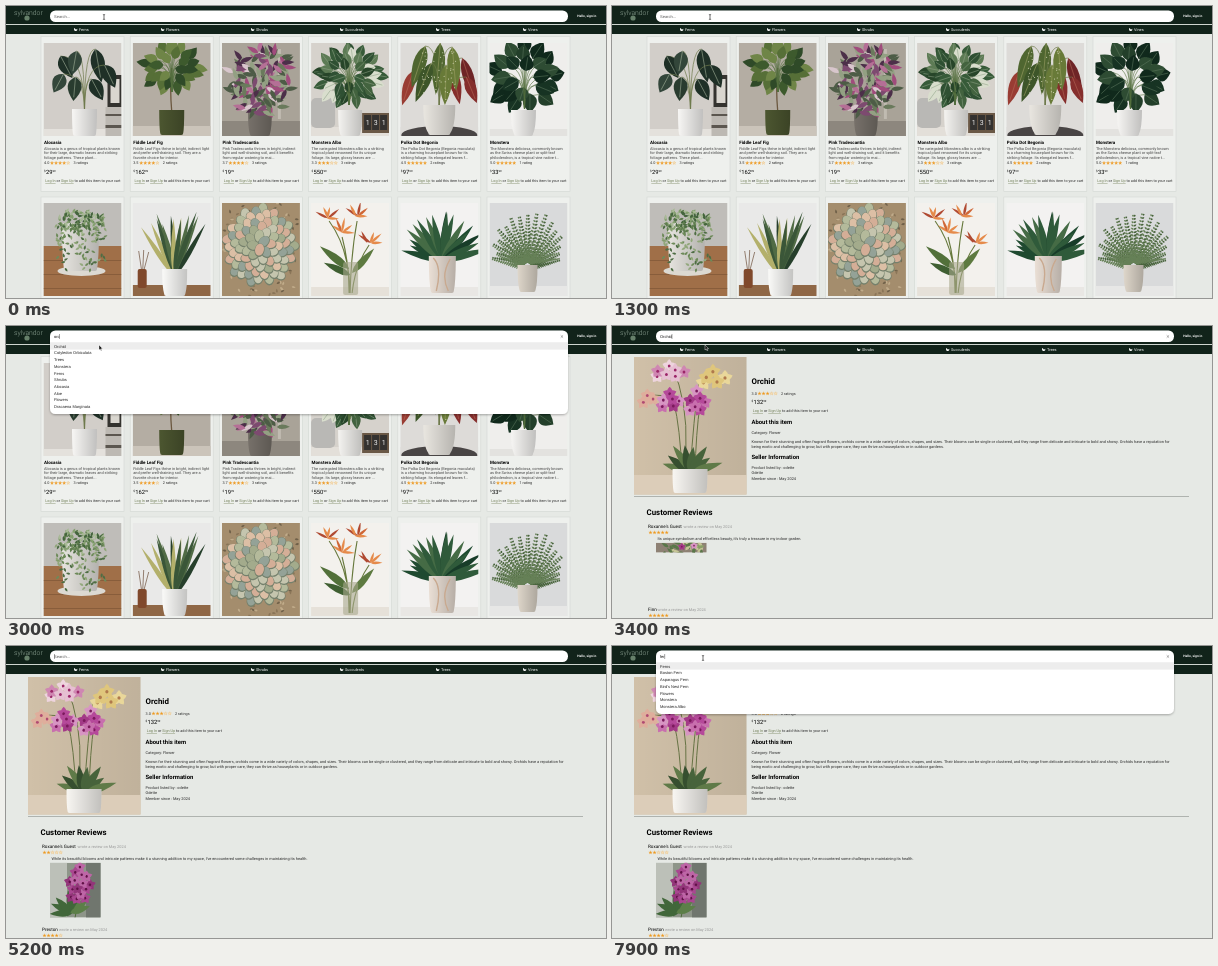
Recreate the animation shown at these times as an HTML page. Size 600 px wide and 292 px high, loop 8000 ms.

```html
<!DOCTYPE html>
<html lang="en">
<head>
<meta charset="utf-8">
<title>Plant shop search</title>
<style>
html, body { margin: 0; width: 100%; height: 100%; overflow: hidden; background: #e6e9e5; }
svg { display: block; }
#stage { width: 100vw; height: 100vh; }
text { font-family: Roboto, sans-serif; text-rendering: geometricPrecision; white-space: pre; }
.ui text, text.ui { font-family: "Liberation Sans", Arial, sans-serif; }
</style>
</head>
<body>
<svg id="stage" viewBox="0 0 600 292">
  <defs>
    <linearGradient id="shade"><stop offset="0" stop-color="#000" stop-opacity="0"/><stop offset="1" stop-color="#000" stop-opacity=".22"/></linearGradient>
    <filter id="soft" x="-5%" y="-20%" width="110%" height="150%"><feDropShadow dx="0" dy="1" stdDeviation="1.2" flood-opacity=".3"/></filter>
  </defs>
  <g id="home"></g>
  <g id="product"></g>
  <g id="header"></g>
  <g id="search"></g>
  <path id="arrow" d="M0 0V5L1.2 4 2 5.8 2.8 5.4 2 3.7H3.6Z" fill="#111" stroke="#fff" stroke-width=".4"/>
  <path id="beam" d="M-1.1-2.5Q0-2.5 0-1.8Q0-2.5 1.1-2.5M0-1.8V1.8M-1.1 2.5Q0 2.5 0 1.8Q0 2.5 1.1 2.5" fill="none" stroke="#111" stroke-width=".6"/>
</svg>
<script>
const $ = id => document.getElementById(id);

// Seeded random numbers keep every leaf in place
let seed = 7;
const rnd = () => (seed = seed * 16807 % 2147483647) / 2147483647;
const vary = d => (rnd() * 2 - 1) * d;
const pick = list => list[Math.floor(rnd() * list.length)];
const times = (n, f) => Array.from({ length: n }, (_, i) => f(i)).join('');

const text = (x, y, size, str, more = '') => `<text x="${x}" y="${y}" font-size="${size}" ${more}>${str}</text>`;
const bold = (x, y, size, str) => text(x, y, size, str, 'font-weight="700"');
const rect = (x, y, w, h, fill, more = '') => `<rect x="${x}" y="${y}" width="${w}" height="${h}" fill="${fill}" ${more}/>`;
const oval = (x, y, rx, ry, fill, turn = 0) => `<ellipse rx="${rx}" ry="${ry}" fill="${fill}" transform="translate(${x} ${y})rotate(${turn})"/>`;
const line = (d, color, w) => `<path d="${d}" fill="none" stroke="${color}" stroke-width="${w}"/>`;

const starPath = 'M' + Array.from({ length: 10 }, (_, i) => {
  const r = i % 2 ? .75 : 1.8, a = i * Math.PI / 5;
  return (r * Math.sin(a)).toFixed(2) + ' ' + (-r * Math.cos(a)).toFixed(2);
}).join('L') + 'Z';
const stars = (x, y, n) => times(5, i =>
  `<path d="${starPath}" transform="translate(${x + i * 4.05} ${y})" fill="${n > i + .4 ? '#ee9a22' : '#f3e4c8'}" stroke="#ee9a22" stroke-width=".2"/>`);

// Plant parts
const leaf = (x, y, angle, len, w, color, vein) =>
  `<g transform="translate(${x} ${y})rotate(${angle})"><path d="M0 0Q${len * .3} ${-w} ${len} 0Q${len * .3} ${w} 0 0" fill="${color}"/>` +
  (vein ? line(`M0 0H${len * .85}`, vein, .5) : '') + '</g>';
const fan = (x, y, n, len, w, colors, from, to) => times(n, i =>
  leaf(x + vary(2), y, from + (to - from) * i / (n - 1) + vary(4), len * (.8 + rnd() * .3), w, pick(colors)));
const scatter = (n, x, y, rx, ry, len, w, colors) => times(n, () => {
  const a = rnd() * 6.28, r = Math.sqrt(rnd());
  return leaf(x + rx * r * Math.cos(a), y + ry * r * Math.sin(a), rnd() * 360, len, w, pick(colors));
});
// Spiral from the rim to the middle; part(x, y, outward angle)
const spiral = (n, x, y, rx, ry, part) => times(n, k => {
  const a = k * 2.4, r = Math.sqrt(1 - k / n);
  return part(x + rx * r * Math.cos(a), y + ry * r * Math.sin(a), a * 180 / Math.PI);
});
const crown = (n, x, y, rx, ry, len, w, colors, vein) => spiral(n, x, y, rx, ry, (lx, ly, a) =>
  line(`M${x} ${y + ry + 8}Q${x} ${ly} ${lx} ${ly}`, '#55703f', .6) + leaf(lx, ly, a + vary(25), len * (.8 + rnd() * .3), w, pick(colors), vein));
// Leaves hanging from stems: [x, y, angle, length]
const hanging = (x, y, spots, w, colors, vein) => spots.map(([lx, ly, a, len]) =>
  line(`M${x} ${y}Q${x} ${ly} ${lx} ${ly}`, '#6f7a4c', .7) + leaf(lx, ly, a, len, w, pick(colors), vein)).join('');
const pot = (x, y, w, h, color, taper = 2) => {
  const d = `M${x - w / 2} ${y}h${w}q0 ${h * .7} ${-taper} ${h - 2}q0 2 -2 2h${4 + 2 * taper - w}q-2 0 -2 -2q${-taper} ${2 - h * .3} ${-taper} ${2 - h}z`;
  return `<path d="${d}" fill="${color}"/><path d="${d}" fill="url(#shade)"/>`;
};
const wall = (color, floor, top) => rect(0, 0, 78, 94, color) + (floor ? rect(0, top, 78, 94 - top, floor) : '');

const pictures = [
  () => wall('#d2cec9', '#e4e1dc', 86) + rect(64, 32, 14, 32, '#34332f') + rect(67, 36, 9, 24, '#d9d6cf') +
    rect(62, 64, 16, 30, '#bdb9b3') + rect(62, 71, 16, 2, '#5b564f') + rect(62, 82, 16, 3, '#5b564f') +
    hanging(41, 68, [[17, 13, 62, 25], [33, 8, 100, 24], [52, 6, 80, 34], [61, 22, 65, 25], [20, 31, 118, 21], [32, 34, 95, 24], [48, 36, 62, 24]], 14, ['#1f3027', '#293c2f', '#33463a'], '#aebda4') +
    pot(41, 66, 25, 27, '#f7f6f4', 1),
  () => wall('#b4ada3', '#cbc4ba', 83) + line('M39 68Q37 45 39 25', '#6b573e', 1.3) +
    crown(30, 39, 24, 21, 17, 15, 9, ['#3d5a2d', '#566f37', '#6f8547', '#2f4a28']) + pot(39, 67, 25, 25, '#4c5630', 1),
  () => wall('#a9a398', '#8d877e', 78) + rect(56, 6, 3, 70, '#c0bbb1') + pot(38, 66, 24, 27, '#77716a') +
    scatter(150, 39, 39, 30, 31, 13, 4.5, ['#7d4a70', '#b56f96', '#d8c6cc', '#4c2f49', '#6a7a5c', '#93a083', '#4d5c46', '#a04c7c']),
  () => wall('#d6d2cc', '#e3dfd9', 84) + rect(0, 55, 24, 30, '#b9b8b5', 'rx="5"') + rect(51, 70, 27, 20, '#6a5846') +
    times(3, i => rect(53 + i * 8, 72, 7, 15, '#343230') + text(54.7 + i * 8, 82, 7, i % 2 ? '3' : '1', 'fill="#eee"')) +
    crown(44, 38, 32, 25, 22, 15, 9, ['#2f5033', '#43633f', '#d9decd', '#274529', '#5d7b55', '#375b39'], '#8fa387') +
    pot(39, 67, 24, 26, '#f4f3f0', 2),
  () => wall('#dddbd8', '#dddbd8', 84) + oval(39, 92, 38, 9, '#494545') +
    hanging(39, 62, [[13, 28, 108, 36], [62, 15, 72, 46], [66, 34, 68, 28], [52, 26, 78, 36]], 11, ['#6e2426', '#852e2c', '#993c33'], '#b56c5a') +
    hanging(39, 62, [[25, 3, 108, 44], [40, 0, 95, 52], [52, 4, 85, 44], [31, 20, 112, 42], [46, 22, 92, 40]], 13, ['#4f6630', '#687a38', '#3d5529'], '#a5a76a') +
    times(60, () => oval(39 + vary(17), 33 + vary(25), .5, .5, '#e3e3cb')) + pot(39, 62, 32, 30, '#e9e6e0', 5),
  () => wall('#efeeec', '#e3e2df', 86) + crown(24, 35, 33, 25, 25, 19, 14, ['#173323', '#233f2a', '#2e4c33', '#10291c'], '#5f7a60') +
    pot(34, 67, 25, 26, '#f6f5f3', 3),
  () => wall('#bfbdb9', '#a06f48', 43) + times(3, i => rect(0, 57 + i * 14, 78, .7, '#7f5636')) + oval(38, 68, 24, 5, '#dcd9d2') +
    pot(37, 20, 37, 48, '#e6e4df', 2) + scatter(130, 37, 18, 22, 11, 5, 2.4, ['#5f7d4e', '#85a070', '#a8b996', '#44653d']) +
    times(8, i => scatter(11, 15 + i * 6.4, 42 + vary(10), 2, 20, 4.5, 2.2, ['#6d8a59', '#91a77a', '#4e6d44'])),
  () => wall('#e9e9e8', '#8f6746', 82) + line('M9 68L6 48M10 68L11 47M11 68L16 49', '#6e503b', .7) + rect(5, 66, 9, 19, '#80492c', 'rx="2"') +
    fan(42, 72, 13, 63, 5, ['#263f2b', '#3a5638', '#b3b06b', '#2f4b31', '#506b45'], -121, -62) + pot(42, 66, 25, 27, '#fafaf8', 2),
  () => wall('#a48d6d') + scatter(120, 39, 47, 45, 52, 4, 2, ['#8a7558', '#c0ab8a', '#6f6049']) + spiral(75, 38, 43, 33, 37, (x, y, a) => {
    const turn = a + 90 + vary(20);
    return oval(x, y, 5, 6.8, '#75806c', turn) + oval(x, y - .6, 4.4, 6, pick(['#b4ba9b', '#d4ae97', '#94a297', '#c5c5ae', '#a3ab8c', '#dcbfa5']), turn);
  }),
  () => wall('#f3f1ed', '#e6e1d9', 84) + line('M39 90Q38 45 18 18M39 90Q40 50 46 18M41 90Q44 62 58 42M38 90Q38 60 31 34', '#66783c', 1.1) +
    [[16, 15], [45, 13], [30, 29], [58, 40]].map(([x, y]) => fan(x, y, 5, 14, 2.6, ['#cf6636', '#e58a4a', '#b04a32'], -150, 0)).join('') +
    leaf(38, 66, -142, 37, 8, '#52703a') + leaf(39, 72, -155, 29, 7, '#3f5f32') + leaf(41, 70, -48, 33, 7, '#5d7a40') +
    rect(32, 59, 15, 33, '#a9a98e', 'opacity=".6" rx="2"'),
  () => wall('#f3f2f1', '#e9e7e4', 84) + fan(42, 58, 17, 46, 7, ['#1f4a30', '#2f5a3a', '#456b45', '#183c29'], -166, -14) +
    pot(42, 53, 27, 37, '#eadfd5', 2) + line('M33 55Q42 64 36 88M50 56Q40 72 48 88', '#c9a98f', 1.4),
  () => wall('#d9dadb', '#e7e7e6', 83) + times(17, i => {
    const a = -168 + i * 9.8, len = 24 + 27 * Math.abs(Math.sin(a * Math.PI / 180)) + vary(5);
    return `<g transform="translate(38 63)rotate(${a})">` + times(15, k => leaf(3 + k * len / 15, 0, 60, 7 - k * .35, 2, '#48633c') +
      leaf(3 + k * len / 15, 0, -60, 7 - k * .35, 2, '#668057')) + '</g>';
  }) + pot(38, 62, 20, 27, '#ded6ca', 2)
];

const cards = [
  ['Alocasia', 4, 3, 29, 'Alocasia is a genus of tropical plants known|for their large, dramatic leaves and striking|foliage patterns. These plant...'],
  ['Fiddle Leaf Fig', 3.5, 2, 162, 'Fiddle Leaf Figs thrive in bright, indirect light|and prefer well-draining soil. They are a|favorite choice for interior.'],
  ['Pink Tradescantia', 3.7, 3, 19, 'Pink Tradescantia thrives in bright, indirect|light and well-draining soil, and it benefits|from regular watering to mai...'],
  ['Monstera Albo', 3.3, 3, 550, 'The variegated Monstera albo is a striking|tropical plant renowned for its unique|foliage. Its large, glossy leaves are ...'],
  ['Polka Dot Begonia', 4.5, 2, 97, 'The Polka Dot Begonia (Begonia maculata)|is a charming houseplant known for its|striking foliage. Its elongated leaves f...'],
  ['Monstera', 5, 1, 33, 'The Monstera deliciosa, commonly known|as the Swiss cheese plant or split-leaf|philodendron, is a tropical vine native t...']
];

const ink = 'fill="#2a2a2a"';
const rating = (x, y, n, count) => text(x, y, 3.8, n.toFixed(1), ink) + stars(x + 8, y - 1.3, n) +
  text(x + 29.5, y, 3.8, `${count} rating${count > 1 ? 's' : ''}`, ink);
const price = (x, y, n) => text(x, y - 1.8, 3, '$') +
  text(x + 2, y, 5.8, `${n}<tspan font-size="2.8" dy="-1.9">99</tspan>`);
const link = s => `<tspan fill="#6f7d55" text-decoration="underline">${s}</tspan>`;
const signUp = (x, y) => text(x, y, 3.75, `${link('Log In')} or ${link('Sign Up')} to add this item to your cart`, ink);
const picture = (x, y, i) => `<svg x="${x}" y="${y}" width="78" height="93">${pictures[i]()}</svg>`;

$('home').innerHTML = rect(0, 0, 600, 292, '#e6e9e5') + times(12, i => {
  const x = 38 + (i % 6) * 89.2, y = i < 6 ? 30.5 : 191;
  const frame = rect(x - 3, y, 83, 155, '#eef0ed', 'stroke="#d3d8d3" stroke-width=".6"');
  if (i > 5) return frame + picture(x - .5, y + 6, i);
  const [name, score, count, cost, about] = cards[i];
  return frame + picture(x - .5, 37, i) + bold(x, 137.6, 4.5, name) +
    about.split('|').map((s, k) => text(x, 143.5 + k * 4.8, 3.9, s, 'fill="#444"')).join('') +
    rating(x, 158.3, score, count) + price(x, 167.6, cost) + signUp(x + 1.3, 176.2);
});

const bloom = (x, y, r, color, heart) => times(5, i => leaf(x, y, i * 72 - 90, r, r * .75, color)) + oval(x, y, r * .2, r * .22, heart);
const spray = (n, x, y, rx, ry, r, colors, heart) => spiral(n, x, y, rx, ry, (bx, by) => bloom(bx, by, r, pick(colors), heart));
const pinks = ['#b5499a', '#c86fae', '#a33a87', '#d795c3'];
const orchid = () => rect(0, 0, 113, 138, '#d0c0a8') + rect(0, 0, 113, 118, 'url(#shade)', 'opacity=".35"') + rect(0, 118, 113, 20, '#dccdb9') +
  line('M50 116Q56 65 45 28Q40 10 20 16M56 116Q60 60 64 30Q70 12 86 22M61 116Q62 75 66 48M48 116Q46 70 40 46Q28 34 12 40', '#667344', 1) +
  spray(5, 78, 21, 13, 8, 8, ['#dfc67c', '#e9d79a'], '#b07a4d') + spray(3, 13, 42, 6, 6, 7, ['#e3c894', '#dfae9c'], '#b04a72') +
  spray(7, 34, 15, 16, 7, 7, ['#e6bfd2', '#eed4de', '#cf87b2'], '#9b2568') +
  spray(6, 35, 44, 10, 9, 7, pinks, '#7b1a5c') + spray(7, 62, 45, 9, 13, 7, pinks, '#7b1a5c') +
  fan(56, 115, 8, 31, 8, ['#47633b', '#5f7a48', '#364f2f'], -165, -15) + pot(56, 112, 35, 24, '#f8f6f2', 1);
const bouquet = () => rect(0, 0, 51, 55, '#8e9589') + rect(0, 0, 17, 55, '#bcc0b8') + rect(36, 0, 15, 55, '#70766e') +
  line('M25 55Q32 28 27 4', '#4d6a38', 1) + fan(22, 50, 7, 25, 7, ['#41673a', '#5c7f48'], -185, -20) +
  spray(15, 29, 22, 11, 19, 6, ['#93357a', '#a94790', '#bd66a6'], '#611147');
const garden = () => rect(0, 0, 51, 10, '#8e8174') + scatter(30, 26, 6, 22, 6, 8, 3, ['#597748', '#88a066', '#c5c596']) +
  spray(2, 30, 3, 8, 2, 4, pinks, '#7b1a5c');

const reviewHead = (y, name, score, offset) => text(36, y, 4.6, name) +
  text(36 + offset, y, 3.9, 'wrote a review on May 2024', 'fill="#999"') + stars(38.5, y + 4.9, score);
const reviews = (id, score, words, art, h, next, nextScore, offset) => `<g id="${id}">` +
  reviewHead(201.6, "Roxanne's Guest", score, 35.6) + text(45.5, 213.8, 3.9, words, ink) +
  `<svg x="44" y="216.7" width="50.5" height="${h}">${art()}</svg>` + reviewHead(284.6, next, nextScore, offset) + '</g>';

$('product').innerHTML = rect(0, 0, 600, 292, '#e6e9e5') +
  `<svg x="22" y="31" width="112.5" height="137.5">${orchid()}</svg>` +
  bold(139.5, 58.3, 7.9, 'Orchid') + rating(139.5, 68.8, 3, 2) + price(139.5, 77.8, 132) + signUp(140.7, 86.3) +
  bold(139.5, 98, 5.9, 'About this item') + bold(139.5, 133, 5.9, 'Seller Information') +
  [[108.2, 'Category: Flower'],
    [116.8, 'Known for their stunning and often fragrant flowers, orchids come in a wide variety of colors, shapes, and sizes. Their blooms can be single or clustered, and they range from delicate and intricate to bold and showy. Orchids have a reputation for'],
    [121.7, 'being exotic and challenging to grow, but with proper care, they can thrive as houseplants or in outdoor gardens.'],
    [143.4, 'Product listed by : odette'], [148.4, 'Odette'], [153.5, 'Member since : May 2024']
  ].map(([y, s]) => text(139.5, y, 3.9, s, ink)).join('') +
  rect(22, 170.2, 555, .7, '#999d99') + bold(34.5, 188.8, 7.9, 'Customer Reviews') +
  reviews('early', 5, "Its unique symbolism and effortless beauty, it's truly a treasure in my indoor garden.", garden, 9.8, 'Finn', 5, 9.5) +
  reviews('late', 2, "While its beautiful blooms and intricate patterns make it a stunning addition to my space, I've encountered some challenges in maintaining its health.", bouquet, 54.7, 'Preston', 4, 17);

const nav = [[73, 'Ferns'], [160, 'Flowers'], [250, 'Shrubs'], [339, 'Succulents'], [435, 'Trees'], [522, 'Vines']];
$('header').innerHTML = rect(0, 0, 600, 28, '#11231a') + rect(0, 18, 600, 1, '#cfd6d0') +
  text(8, 8.7, 6.8, 'sylvandor', 'font-weight="300" fill="#8da293"') + '<circle cx="21" cy="12" r="2.6" fill="#66806a"/>' +
  text(571.3, 10.6, 3.25, 'Hello, sign in', 'font-weight="700" fill="#fff"') +
  nav.map(([x, s]) => leaf(x - 3.2, 25, -120, 3.6, 1.8, '#fff') + leaf(x - 3.2, 25, -55, 2.8, 1.4, '#fff') +
    text(x, 25, 3.9, s, 'fill="#fff"')).join('');

$('search').innerHTML = rect(44, 4.5, 518, 11.5, '#fff', 'id="box" rx="5.5"') +
  '<g id="list" class="ui"></g>' + text(48, 11.9, 4, '', 'id="query" class="ui"') +
  rect(48, 8, .4, 5, '#222', 'id="caret"') + line('M554.7 9.3l2.4 2.4m0-2.4l-2.4 2.4', '#777', .6).replace('<path', '<path id="clear"');

const orchidHits = ['Orchid', 'Cotyledon Orbiculata', 'Trees', 'Monstera', 'Ferns', 'Shrubs', 'Alocasia', 'Aloe', 'Flowers', 'Dracaena Marginata'];
const fernHits = ['Ferns', 'Boston Fern', 'Asparagus Fern', "Bird's Nest Fern", 'Flowers', 'Monstera', 'Monstera Albo'];
const pageLoad = 3100, reviewSwap = 3900, cleared = 4800;
const typing = [[0, ''], [1950, 'o'], [2100, 'or'], [2250, 'orc'], [pageLoad, 'Orchid'], [cleared, ''], [7450, 'f'], [7600, 'fe'], [7750, 'fer']];

// Pointer path: time, x, y
const pointer = [[0, 98, 11], [2700, 98, 11], [3000, 93, 21], [3700, 93, 21], [4400, 72, 11], [7800, 91, 12], [8000, 91, 12]];
function pointerAt(t) {
  const i = pointer.findIndex(p => p[0] > t), [t0, x0, y0] = pointer[i - 1], [t1, x1, y1] = pointer[i];
  const k = (t - t0) / (t1 - t0), e = k * k * (3 - 2 * k);
  return [x0 + (x1 - x0) * e, y0 + (y1 - y0) * e];
}

const show = (id, on) => $(id).setAttribute('display', on ? 'inline' : 'none');
let lastHits;
function setHits(hits) {
  if (hits === lastHits) return;
  lastHits = hits;
  $('box').setAttribute('height', hits.length ? 16.5 + hits.length * 6.7 : 11.5);
  $('box').setAttribute('filter', hits.length ? 'url(#soft)' : 'none');
  $('list').innerHTML = !hits.length ? '' : rect(44, 16.3, 518, .4, '#ddd') + rect(44, 16.9, 518, 6.7, '#ededed') +
    hits.map((s, i) => text(48, 21.7 + i * 6.7, 4, s, 'fill="#222"')).join('');
}

const none = [];
function draw(now) {
  const t = now % 8000;
  const query = typing.filter(s => s[0] <= t).pop()[1];
  const input = $('query');
  if (input.textContent !== (query || 'Search...')) input.textContent = query || 'Search...';
  input.setAttribute('fill', query ? '#111' : '#555');
  setHits(!query || query === 'Orchid' ? none : t < pageLoad ? orchidHits : fernHits);

  show('home', t < pageLoad);
  show('product', t >= pageLoad);
  show('early', t < reviewSwap);
  show('late', t >= reviewSwap);
  show('clear', query);
  show('caret', t >= 1800 && (query || (t + 350) % 1000 >= 500));
  $('caret').setAttribute('x', 48 + (query ? input.getComputedTextLength() : 0));

  const beam = t < 1950 || t >= 7800 || (t >= 4200 && t < cleared);
  show('beam', beam);
  show('arrow', !beam && t >= 2700 && t < cleared);
  const move = `translate(${pointerAt(t).join(' ')})`;
  $('beam').setAttribute('transform', move);
  $('arrow').setAttribute('transform', move + 'translate(0 -2)');
  requestAnimationFrame(draw);
}
requestAnimationFrame(draw);
</script>
</body>
</html>
```
